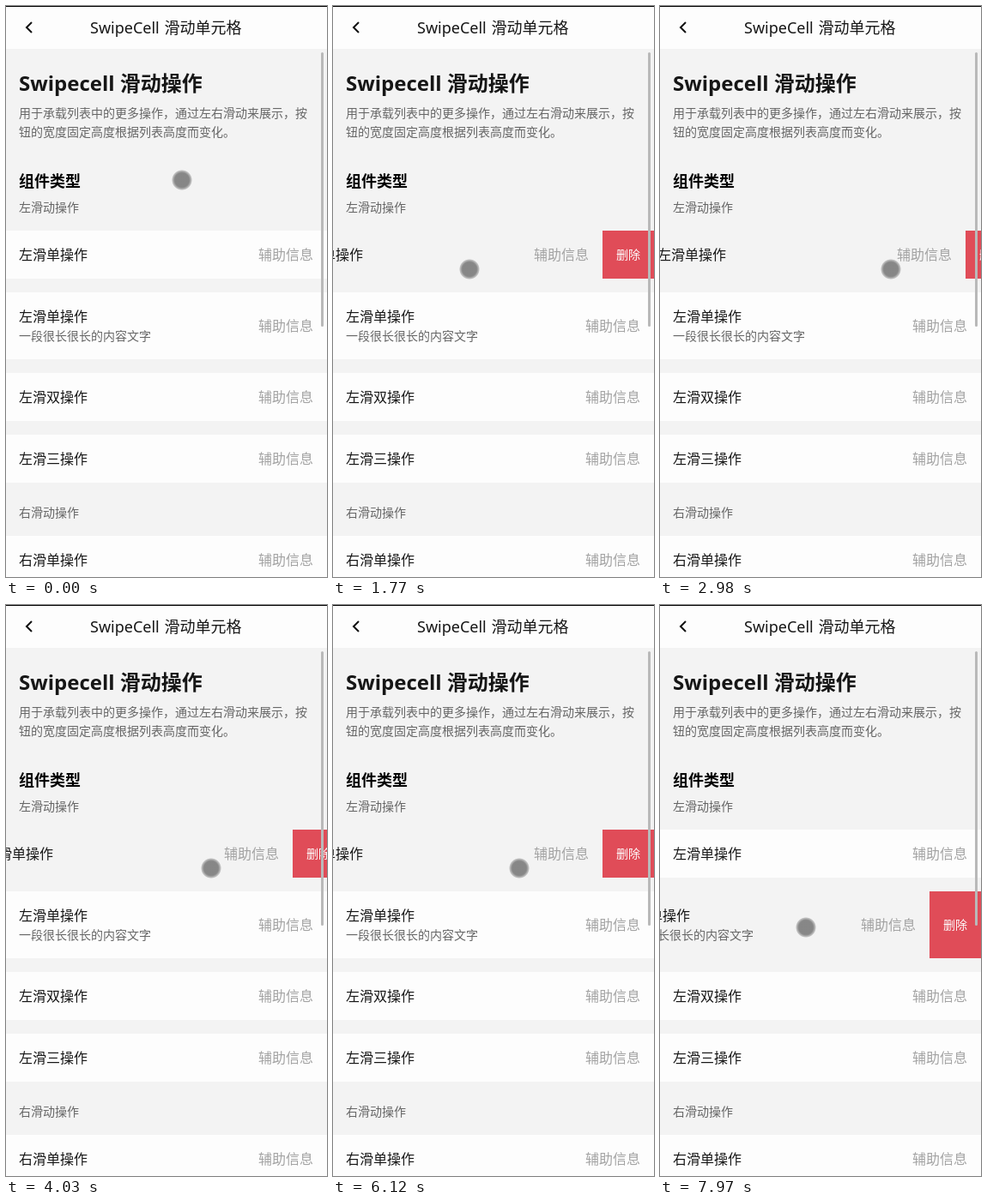
An HTML page for the animation above (8 s loop, 374x666 px).

```html
<!DOCTYPE html>
<html lang="zh-CN">
<head>
<meta charset="utf-8">
<title>SwipeCell</title>
<style>
  html, body { margin: 0; width: 100%; height: 100%; overflow: hidden; }
  body { font-family: "Noto Sans", "Noto Sans CJK SC", "Noto Sans CJK", sans-serif; }
  #stage { position: relative; width: 374px; height: 666px; overflow: hidden; background: #f3f3f3; color: #161616; }
  #stage div { position: absolute; white-space: nowrap; }
  .header { inset: 0 0 auto; height: 50px; box-sizing: border-box; border-top: 1px solid #000; background: #fdfdfd; }
  .header svg { position: absolute; left: 20px; top: 15px; }
  .bar-title { left: 98px; top: 10px; font-size: 18px; line-height: 28px; word-spacing: 1px; }
  .title { left: 15px; top: 74px; font: 700 24px/32px "Noto Sans", "Noto Sans CJK SC", "Noto Sans CJK", sans-serif; }
  .intro { left: 15px; top: 114px; }
  .small { font-size: 14px; line-height: 22px; color: #666; }
  .section { left: 15px; top: 191px; font-size: 18px; font-weight: 700; line-height: 26px; color: #000; }
  .row { left: 0; width: 374px; overflow: hidden; background: #fdfdfd; font-size: 16px; line-height: 24px; }
  .row.pressed { background: #f3f3f3; }
  .slide { inset: 0; }
  .label { left: 15px; top: 16px; }
  .note { right: 16px; top: calc(50% - 12px); color: #a3a3a3; }
  .delete { left: 100%; top: 0; width: 60px; height: 100%; background: #e04c58; color: #fdfdfd; font-size: 14px;
    display: flex; align-items: center; justify-content: center; }
  .scrollbar { left: 367px; top: 54px; width: 3px; height: 320px; border-radius: 2px; background: #b9b9b9; }
  .touch { left: -12px; top: -12px; width: 24px; height: 24px; border-radius: 50%;
    background: radial-gradient(circle, #7c7c7ce8 0 8px, #828282e0 9px, #a0a0a0d8 10px, #a8a8a8b0 11px, #a8a8a800 12px); }
</style>
</head>
<body>
<div id="stage">
  <div class="header">
    <svg width="14" height="18" viewBox="0 0 14 18"><path d="M10 3 4 9l6 6" fill="none" stroke="#111" stroke-width="2"/></svg>
    <div class="bar-title">SwipeCell 滑动单元格</div>
  </div>
  <div class="title">Swipecell 滑动操作</div>
  <div class="intro small">用于承载列表中的更多操作，通过左右滑动来展示，按<br>钮的宽度固定高度根据列表高度而变化。</div>
  <div class="section">组件类型</div>
  <div class="small" style="left:15px;top:224px">左滑动操作</div>
  <div class="small" style="left:15px;top:580px">右滑动操作</div>
</div>
<script>
const LOOP = 8000;
const LAG = 35;
const BUTTON = 60;
const stage = document.getElementById('stage');

function add(parent, className, text = '') {
  const el = document.createElement('div');
  el.className = className;
  el.textContent = text;
  parent.append(el);
  return el;
}

function addRow(top, height, label, detail) {
  const row = add(stage, 'row');
  row.style.top = top + 'px';
  row.style.height = height + 'px';
  const slide = add(row, 'slide');
  add(slide, 'label', label);
  if (detail) {
    const line = add(slide, 'small', detail);
    line.style.left = '15px';
    line.style.top = '40px';
  }
  add(slide, 'note', '辅助信息');
  add(slide, 'delete', '删除');
  return { row, slide };
}

const first = addRow(262, 56, '左滑单操作');
const second = addRow(334, 78, '左滑单操作', '一段很长很长的内容文字');
addRow(428, 56, '左滑双操作');
addRow(500, 56, '左滑三操作');
addRow(618, 56, '右滑单操作');
add(stage, 'scrollbar');
const touch = add(stage, 'touch');

// Touch path: time, x, y. Each stroke eases between two rests.
const path = [
  [0, 205, 203], [240, 205, 203], [760, 287, 305], [1330, 159, 307],
  [1730, 159, 307], [2800, 268, 307], [3800, 280, 307], [4190, 215, 307],
  [4400, 215, 307], [4990, 273, 307], [5190, 276, 307],
  [5330, 276, 307], [5920, 215, 307], [6050, 215, 307], [6850, 309, 301],
  [7290, 285, 372], [7500, 285, 372], [7970, 170, 376], [LOOP, 170, 376]
];

// Each drag: cell, press time, release time, x at press
const drags = [[first, 780, 6890, 287], [second, 7450, LOOP, 285]];

function pointAt(t) {
  const i = Math.max(1, path.findIndex(p => p[0] >= t));
  const [t0, x0, y0] = path[i - 1];
  const [t1, x1, y1] = path[i];
  const u = Math.max(0, (t - t0) / (t1 - t0));
  const s = u * u * (3 - 2 * u);
  return [x0 + (x1 - x0) * s, y0 + (y1 - y0) * s];
}

function draw(t) {
  const [x, y] = pointAt(t);
  touch.style.transform = `translate(${Math.round(x)}px, ${Math.round(y)}px)`;
  for (const [cell, start, end, origin] of drags) {
    const pressed = t >= start && t < end;
    const shift = pressed ? Math.round(pointAt(t - LAG)[0] - origin) : 0;
    cell.row.classList.toggle('pressed', pressed);
    cell.slide.style.transform = `translateX(${Math.min(0, Math.max(-BUTTON, shift))}px)`;
  }
}

const began = performance.now();
function frame() {
  draw((performance.now() - began) % LOOP);
  requestAnimationFrame(frame);
}
frame();
</script>
</body>
</html>
```
